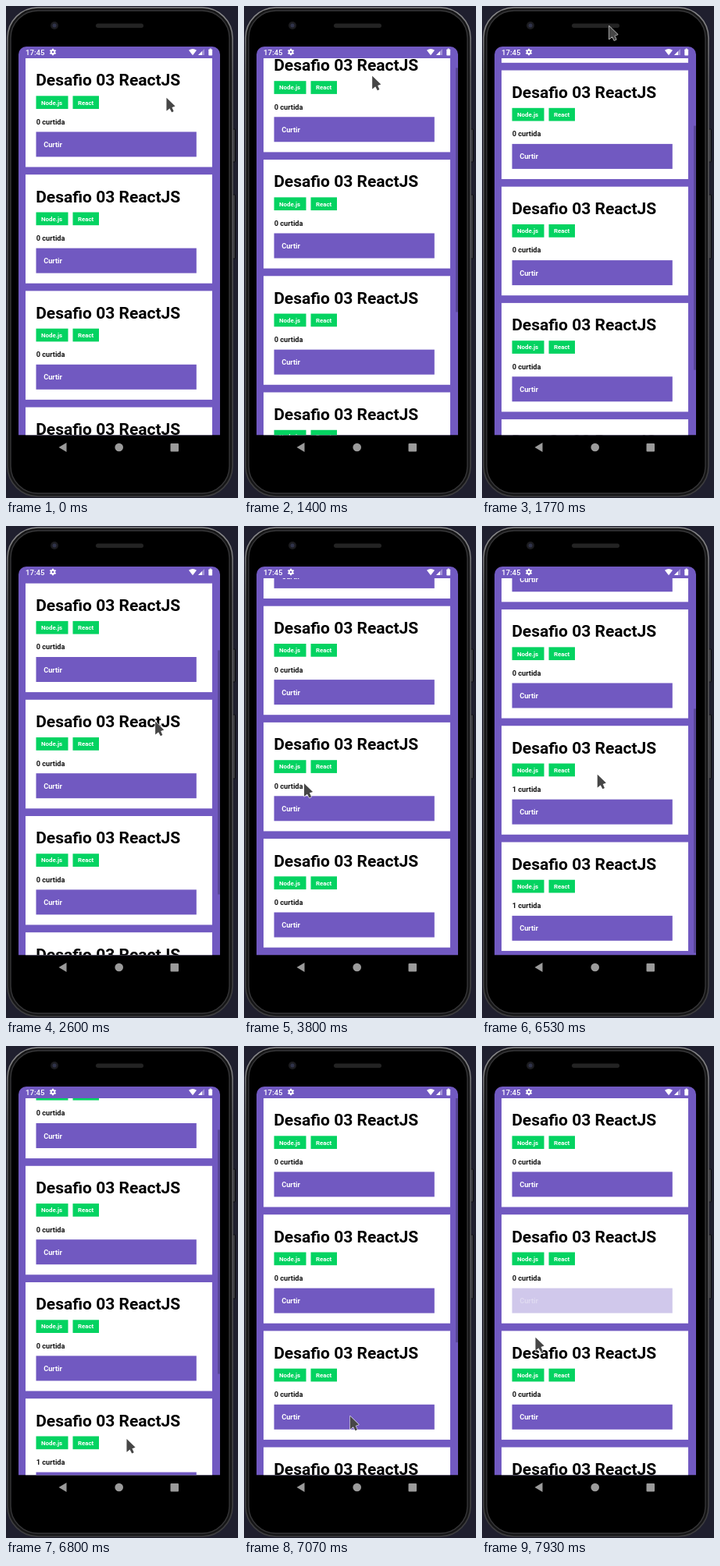
Write an HTML page with a canvas that moves like this. It is 297 px wide and 631 px high and loops after 8 s.

```html
<!DOCTYPE html>
<html lang="pt">
<head>
<meta charset="utf-8">
<style>
  html, body { margin: 0; width: 100%; height: 100%; overflow: hidden; background: #1f1f2e; }
  canvas { display: block; }
</style>
</head>
<body>
<canvas id="stage" width="297" height="631"></canvas>
<script>
const ctx = document.getElementById('stage').getContext('2d');
const LOOP = 8000;
const PURPLE = '#7159c1', GREEN = '#04d361';
const SCREEN = { x: 16, y: 52, w: 258, bottom: 550.3 };
const LIST_TOP = 67, PITCH = 149.2, CARD_H = 139.5, CARDS = 5;
const VIEW_H = SCREEN.bottom - LIST_TOP, CONTENT_H = PITCH * CARDS;
const MAX_SCROLL = CONTENT_H - VIEW_H;

const linear = p => p;
const smooth = p => p * p * (3 - 2 * p);
const easeOut = p => 1 - (1 - p) ** 3;
const clamp = v => Math.min(1, Math.max(0, v));
const move = (start, length, to, ease = smooth) => ({ start, length, to, ease });

// The pointer glides between targets and drags at a steady speed.
const pointer = { from: [205, 117], moves: [
  move(330, 400, [166, 139]),
  move(1275, 330, [160, 8], linear),
  move(1700, 330, [178, 150]),
  move(2230, 220, [191, 268]),
  move(2550, 450, [188, 109], linear),
  move(3170, 800, [62, 358]),
  move(4500, 530, [64, 511]),
  move(5450, 380, [148, 311]),
  move(5870, 360, [146, 283]),
  move(6480, 360, [155, 530], linear),
  move(6950, 380, [73, 296]),
  move(7465, 5, [72, 306]),
  move(7920, 5, [68, 373])
] };
const scrolling = { from: [0], moves: [
  move(1370, 660, [142.3], easeOut),
  move(2600, 400, [MAX_SCROLL], linear),
  move(6525, 362, [0], linear)
] };
const barShown = [{ on: 1340, off: 3600 }, { on: 6430, off: 7925 }];
const taps = { 1: 7925, 3: 3900, 4: 5150 };
const HOLD = 250, RELEASE = 150, REPLY = 570;

// Each move starts from wherever the previous one ended.
function follow({ from, moves }, t) {
  return moves.reduce((pos, m) => {
    const p = m.ease(clamp((t - m.start) / m.length));
    return pos.map((v, i) => v + (m.to[i] - v) * p);
  }, from);
}

function box(x, y, w, h, color) {
  ctx.fillStyle = color;
  ctx.fillRect(x, y, w, h);
}

function rounded(x, y, w, h, r, fill, stroke, line = 1) {
  ctx.beginPath();
  ctx.roundRect(x, y, w, h, r);
  ctx.fillStyle = fill;
  ctx.fill();
  if (!stroke) return;
  ctx.strokeStyle = stroke;
  ctx.lineWidth = line;
  ctx.stroke();
}

function disc(x, y, r, color) {
  ctx.beginPath();
  ctx.arc(x, y, r, 0, Math.PI * 2);
  ctx.fillStyle = color;
  ctx.fill();
}

function poly(points, fill) {
  ctx.beginPath();
  points.forEach(([x, y]) => ctx.lineTo(x, y));
  ctx.closePath();
  ctx.fillStyle = fill;
  ctx.fill();
}

function label(text, x, y, size, color, weight = 700) {
  ctx.font = `${weight} ${size}px Roboto, sans-serif`;
  ctx.fillStyle = color;
  ctx.fillText(text, x, y);
}

function drawPhone() {
  box(0, 0, 297, 631, '#1f1f2e');
  rounded(289, 158, 4.5, 42, 1, '#3a3a40', '#0c0c10');
  rounded(289, 242, 4.5, 82, 1, '#3a3a40', '#0c0c10');
  const rim = ctx.createLinearGradient(0, 0, 0, 631);
  rim.addColorStop(0, '#8a8a8c');
  rim.addColorStop(.15, '#5c5c5e');
  rim.addColorStop(1, '#3c3c3e');
  rounded(2, 2, 288, 627, 39, '#161617', rim, 1.6);
  rounded(6, 6, 280, 619, 35, '#000', '#363638', 1.4);
  disc(62, 25, 5, '#1c1c20');
  disc(62, 25, 2.5, '#30334a');
  rounded(115, 22.5, 61, 5.5, 2.7, '#232323');
  poly([[67.5, 566], [77.5, 560], [77.5, 572]], '#9b9b9b');
  disc(144.7, 566, 5.3, '#9b9b9b');
  rounded(210.5, 561, 10.5, 10.5, 1, '#9b9b9b');
}

function drawStatus() {
  label('17:45', 25, 62.6, 9.6, '#fff', 500);
  ctx.save();
  ctx.translate(60, 59);
  for (let i = 0; i < 6; i++) {
    box(-1.1, -4.2, 2.2, 3, '#fff');
    ctx.rotate(Math.PI / 3);
  }
  disc(0, 0, 3.1, '#fff');
  disc(0, 0, 1.3, PURPLE);
  ctx.restore();

  ctx.beginPath();
  ctx.moveTo(239, 63.3);
  ctx.lineTo(234, 56.8);
  ctx.quadraticCurveTo(239, 53.2, 244, 56.8);
  ctx.closePath();
  ctx.fillStyle = '#fff';
  ctx.fill();
  poly([[246, 63], [254, 63], [254, 55]], 'rgba(255,255,255,.35)');
  poly([[246, 63], [251, 63], [251, 58]], '#fff');
  rounded(259.3, 55.5, 4.8, 8, .7, '#fff');
  box(260.7, 54.5, 2, 1.2, '#fff');
}

function drawTag(text, x, y, w) {
  box(x, y, w, 16.7, GREEN);
  label(text, x + 6.4, y + 11.2, 7.9, '#fff');
}

function buttonAlpha(tap, t) {
  if (!(t >= tap)) return 1;
  return .33 + .67 * clamp((t - tap - HOLD) / RELEASE);
}

function drawCard(index, top, t) {
  const tap = taps[index];
  const likes = t >= tap + REPLY ? 1 : 0;
  box(25, top, 239, CARD_H, '#fff');
  label('Desafio 03 ReactJS', 38.2, top + 35.4, 21, '#000');
  drawTag('Node.js', 38.5, top + 48.3, 41);
  drawTag('React', 85.5, top + 48.3, 33.5);
  label(`${likes} curtida`, 38.7, top + 84.8, 9.2, '#111');
  ctx.save();
  ctx.globalAlpha = buttonAlpha(tap, t);
  box(38.5, top + 94.4, 205.3, 32, PURPLE);
  label('Curtir', 48.2, top + 114, 9.2, '#fff');
  ctx.restore();
}

function drawScreen(t) {
  const [scroll] = follow(scrolling, t);
  rounded(SCREEN.x, SCREEN.y, SCREEN.w, SCREEN.bottom - SCREEN.y, [10, 10, 0, 0], PURPLE);
  drawStatus();
  ctx.save();
  ctx.beginPath();
  ctx.rect(SCREEN.x, LIST_TOP, SCREEN.w, VIEW_H);
  ctx.clip();
  for (let i = 0; i < CARDS; i++) drawCard(i, LIST_TOP + i * PITCH - scroll, t);
  if (barShown.some(({ on, off }) => t >= on && t < off)) {
    const ratio = VIEW_H / CONTENT_H;
    box(271, LIST_TOP + scroll * ratio, 3, VIEW_H * ratio, 'rgba(0,0,0,.22)');
  }
  ctx.restore();
}

function drawCursor(t) {
  const [x, y] = follow(pointer, t);
  ctx.save();
  ctx.translate(x, y);
  ctx.lineJoin = 'round';
  ctx.strokeStyle = 'rgba(255,255,255,.75)';
  ctx.lineWidth = 1.4;
  const arrow = [[.5, .8], [.5, 17.5], [4.5, 14.3], [7.2, 19.2], [9.6, 18], [7.4, 13], [11.5, 11.6]];
  poly(arrow, '#464646');
  ctx.stroke();
  poly(arrow, '#464646');
  ctx.restore();
}

function render(t) {
  drawPhone();
  drawScreen(t);
  drawCursor(t);
}

const start = performance.now();
function tick() {
  render((performance.now() - start) % LOOP);
  requestAnimationFrame(tick);
}
tick();
</script>
</body>
</html>
```
